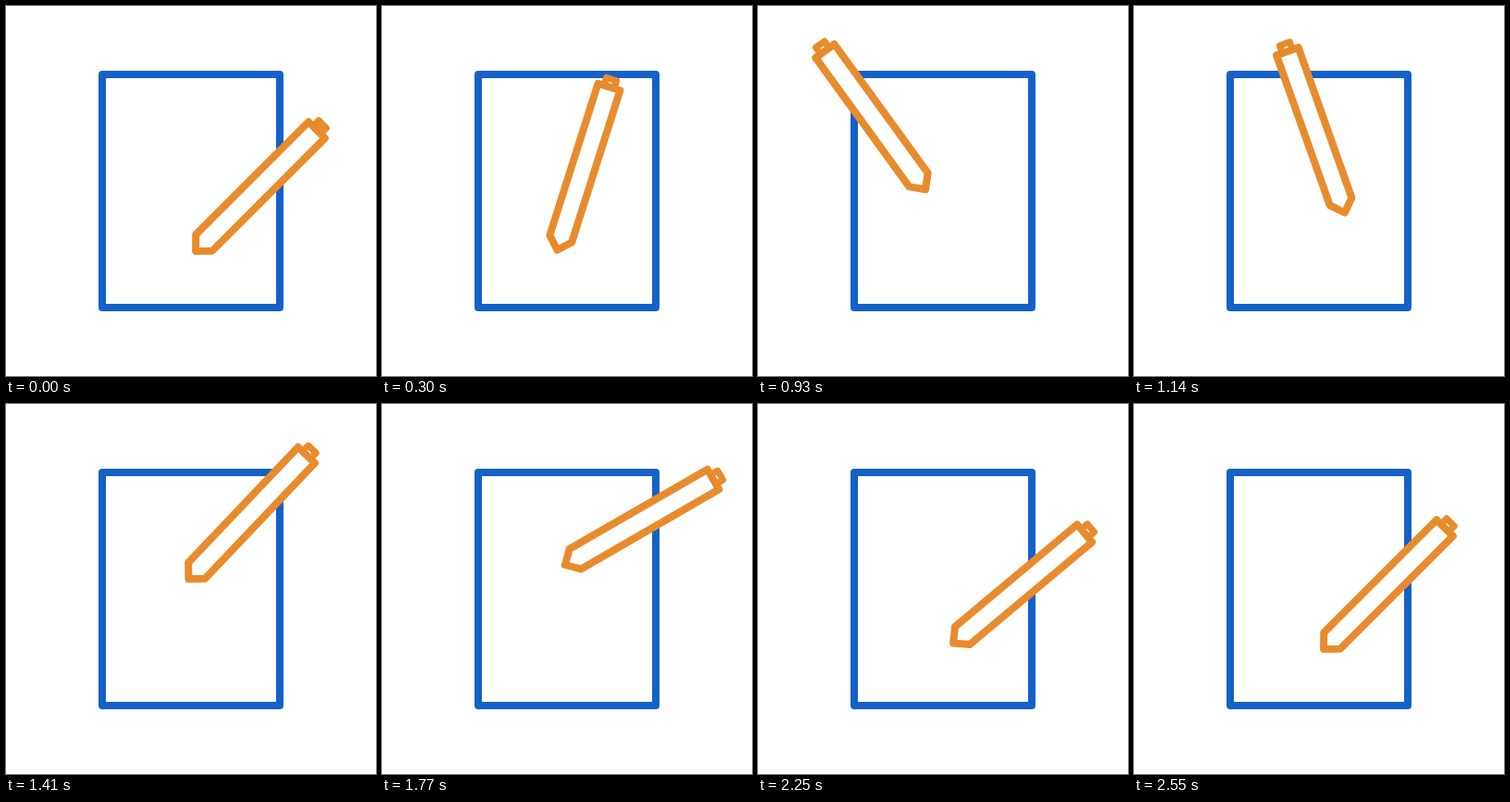
An HTML page for the animation above (3610 ms loop, 400 by 400 pixels).

```html
<!DOCTYPE html>
<html lang="en">
<head>
<meta charset="utf-8">
<title>Pen and paper</title>
<style>
  html, body { margin: 0; width: 100%; height: 100%; overflow: hidden; background: #fff; }
  svg { display: block; width: 100vw; height: 100vh; }
  path, rect { fill: #fff; stroke-linejoin: round; stroke-width: 8; }
  #sheet { stroke: #1461c9; }
  #pen { stroke: #e88b2d; }
  #cap { stroke-width: 7; }
</style>
</head>
<body>
<svg viewBox="0 0 400 400">
  <rect id="sheet" x="104" y="74" width="192" height="252"/>
  <g id="pen">
    <path id="cap" d="M-5.8 -89V-97.8H5.8V-89Z"/>
    <path d="M0 96L-12.5 83.3V-89H12.5V83.3Z"/>
  </g>
</svg>
<script>
const STEP = 30, LOOP = 3610, LAST = 85;

// The pen swings between these tilts: three equal turns with short rests.
const tilts = [45, -36, 60, 45];
const TURN = 24, GAP = 30.5;

// Waypoints of the pen's centre: step, x, y
const path = [
  [0, 273, 197], [10, 218.5, 172.3], [18, 114, 112], [21, 99, 102],
  [25, 95, 96], [33, 139, 128], [38, 195.7, 133], [45, 255, 123],
  [54, 278.5, 110.8], [59, 281, 126], [67, 294, 163.4],
  [72, 297, 190.6], [79, 268, 200], [LAST, 273, 197]
];

const pen = document.getElementById('pen');
const cap = document.getElementById('cap');

const clamp = u => Math.max(0, Math.min(1, u));
const ease = u => u * u / (u * u + (1 - u) * (1 - u));

function tiltAt(n) {
  let tilt = tilts[0];
  for (let i = 0; i < 3; i++)
    tilt += (tilts[i + 1] - tilts[i]) * ease(clamp((n - i * GAP) / TURN));
  return tilt;
}

// Slope through the neighbours; the pen rests at both ends.
function slope(i, k) {
  const a = path[i - 1], b = path[i + 1];
  return a && b ? (b[k] - a[k]) / (b[0] - a[0]) : 0;
}

function centreAt(n) {
  let i = 0;
  while (i < path.length - 2 && n >= path[i + 1][0]) i++;
  const a = path[i], b = path[i + 1];
  const d = b[0] - a[0], u = (n - a[0]) / d, v = 1 - u;
  return [1, 2].map(k =>
    v * v * (1 + 2 * u) * a[k] + u * u * (3 - 2 * u) * b[k] +
    d * u * v * (v * slope(i, k) - u * slope(i + 1, k)));
}

function draw(ms) {
  const n = Math.min(LAST, Math.floor((ms % LOOP) / STEP));
  const [x, y] = centreAt(n);
  pen.setAttribute('transform', `translate(${x} ${y}) rotate(${tiltAt(n)})`);
  // The cap is solid as the loop opens.
  cap.style.fill = n ? '#fff' : '#e88b2d';
}

const start = performance.now();
function tick() {
  draw(performance.now() - start);
  requestAnimationFrame(tick);
}
tick();
</script>
</body>
</html>
```
